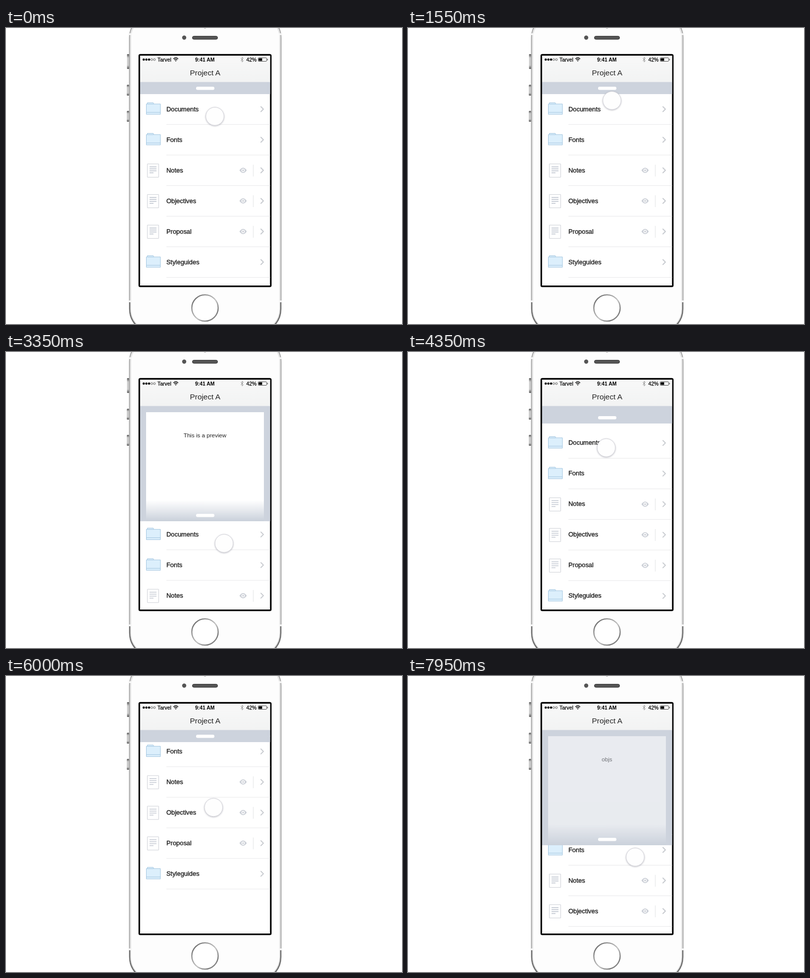
An HTML page for the animation above (8000 ms loop, 800 by 600 pixels).

```html
<!DOCTYPE html>
<html lang="en">
<head>
<meta charset="utf-8">
<title>Project files</title>
<style>
  html, body { margin: 0; width: 100%; height: 100%; overflow: hidden; background: #fff; }
  svg { display: block; width: 800px; height: 600px; }
  text { font-family: "Liberation Sans", Arial, sans-serif; fill: #222; }
  .medium { stroke: #222; stroke-width: .4; }
  .status { font-size: 10.4px; fill: #000; stroke: #000; stroke-width: .25; }
  .label { font-size: 12.9px; }
  .line { fill: none; stroke-linecap: round; stroke-linejoin: round; }
</style>
</head>
<body>
<svg viewBox="0 0 800 600">
  <defs>
    <clipPath id="screenClip"><rect x="271" y="56" width="262.5" height="466.5"/></clipPath>
    <clipPath id="chinClip"><rect x="240" y="556" width="325" height="44"/></clipPath>
    <linearGradient id="header" x2="0" y2="1">
      <stop stop-color="#f8f8f8"/><stop offset="1" stop-color="#f2f3f3"/>
    </linearGradient>
    <linearGradient id="fade" x2="0" y2="1">
      <stop stop-color="#cdd3dd" stop-opacity="0"/><stop offset="1" stop-color="#c9d0da"/>
    </linearGradient>
    <linearGradient id="ring" x2="1" y2="1">
      <stop stop-color="#555"/><stop offset=".3" stop-color="#999"/>
      <stop offset=".55" stop-color="#c4c4c4"/><stop offset=".8" stop-color="#777"/>
      <stop offset="1" stop-color="#aaa"/>
    </linearGradient>
    <linearGradient id="button" x2="0" y2="1">
      <stop stop-color="#555"/><stop offset=".25" stop-color="#ccc"/>
      <stop offset=".75" stop-color="#ccc"/><stop offset="1" stop-color="#555"/>
    </linearGradient>
    <filter id="shadow" x="-30%" y="-30%" width="160%" height="160%">
      <feDropShadow dx="0" dy="1" stdDeviation="1.6" flood-color="#555566" flood-opacity=".4"/>
    </filter>

    <g id="chevron"><path class="line" d="M515 -4.5l5 5-5 5" stroke="#c6c9ce" stroke-width="1.9"/></g>
    <g id="folder">
      <path d="M285.5 -10v-2.5h12l1 2.5h13.5v21h-28.5v-21z" fill="#dceffc" stroke="#a3c5df"/>
      <path d="M285.5 -9.8h13M283.5 7h28.5" stroke="#a3c5df" fill="none"/>
    </g>
    <g id="note">
      <rect x="285.5" y="-12.5" width="23" height="27" rx=".5" fill="#fff" stroke="#cdd0d6"/>
      <path d="M290 -6.5h14M290 -2.5h14M290 1.5h14M290 5.5h8" stroke="#b9bfca" stroke-width="1.3"/>
      <path d="M471.5 .5q7.5-10.5 15 0q-7.5 10.5-15 0z" fill="#cdd1d8"/>
      <circle cx="479" cy=".5" r="3.3" fill="#fff"/>
      <circle cx="479" cy=".5" r="1.7" fill="#c6cad2"/>
      <path d="M499.5 -11v24" stroke="#e2e3e5"/>
    </g>
  </defs>

  <g id="phone">
    <g fill="url(#button)">
      <rect x="244.5" y="53" width="4.5" height="30" rx="1"/>
      <rect x="244" y="115" width="5" height="22" rx="1.5"/>
      <rect x="244" y="168" width="5" height="22" rx="1.5"/>
    </g>
    <rect x="249.5" y="-28" width="306" height="646" rx="48" fill="#fff" stroke="#a2a2a2" stroke-width="2"/>
    <rect x="252" y="-25.5" width="301" height="641" rx="46" fill="#fdfdfd" stroke="#dedede" stroke-width="1.5"/>
    <rect x="250" y="-28" width="305" height="645.5" rx="48" fill="none" stroke="#6d6d6d" stroke-width="2.2" clip-path="url(#chinClip)"/>
    <path d="M247 12.5h7M551 12.5h7M247 554h7M551 554h7" stroke="#f8f8f8" stroke-width="3.5"/>
    <circle cx="402" cy="-2" r="3" fill="#aaa"/>
    <circle cx="360" cy="19.5" r="4.2" fill="#555"/>
    <rect x="376.5" y="16.5" width="51" height="6.5" rx="3.2" fill="#555" stroke="#333"/>
    <circle cx="402" cy="567.5" r="26.6" fill="#fff" stroke="url(#ring)" stroke-width="2.4"/>
    <rect x="269.3" y="54.3" width="265.6" height="469.4" rx="2" fill="#fff" stroke="#000" stroke-width="3.2"/>
  </g>

  <g clip-path="url(#screenClip)">
    <g id="list"></g>
    <g id="panel">
      <rect id="backdrop" x="271" y="109" width="263" fill="#cdd3dd"/>
      <g id="card">
        <rect id="paper" x="283" y="122" width="238" fill="#fff"/>
        <text id="caption" x="402" y="172.5" font-size="11.6" text-anchor="middle"></text>
        <rect id="cardFade" x="283" width="238" height="43" fill="url(#fade)"/>
      </g>
      <rect id="handle" x="384" width="37" height="6.5" rx="3" fill="#fff"/>
    </g>
    <rect x="271" y="56" width="263" height="53.5" fill="url(#header)"/>
    <text x="402.3" y="95.5" font-size="15.4" text-anchor="middle">Project A</text>
    <g id="dots"></g>
    <text class="status" x="306" y="67.7" font-size="10">Tarvel</text>
    <g class="line" stroke="#000" stroke-width="1.4">
      <path d="M338.6 62.3q4.4-4 8.8 0M340.5 64.4q2.5-2.2 5 0"/>
      <path d="M342.8 66.5h.4" stroke-width="1.8"/>
    </g>
    <text class="status" x="401.7" y="67.7" text-anchor="middle" font-weight="bold" style="stroke:none">9:41 AM</text>
    <path class="line" d="M474.5 61.5l5 5-2.5 2.5v-10l2.5 2.5-5 5" stroke="#888" stroke-width=".9"/>
    <text class="status" x="485.5" y="67.7">42%</text>
    <rect x="509.5" y="60.5" width="17" height="7" rx="1" fill="#fff" stroke="#333" stroke-width=".9"/>
    <rect x="510.5" y="61.5" width="7" height="5" fill="#000"/>
    <path d="M528.5 62.5v3" stroke="#333"/>
  </g>
  <circle id="touch" r="18.3" fill="#fff" fill-opacity=".97" stroke="#cfcfd6" filter="url(#shadow)"/>
</svg>

<script>
const LOOP = 8000, HEADER = 109, CLOSED = 134, ROW = 62;
const byId = id => document.getElementById(id);
const set = (id, attrs) => {
  for (const name in attrs) byId(id).setAttribute(name, attrs[name]);
};

const files = [
  ["Documents", "folder"], ["Fonts", "folder"], ["Notes", "note"],
  ["Objectives", "note"], ["Proposal", "note"], ["Styleguides", "folder"]
];
byId("list").innerHTML = files.map(([name, kind], i) => `
  <g transform="translate(0 ${164 + i * ROW})">
    <use href="#${kind}"/><use href="#chevron"/>
    <text class="label medium" x="324" y="4.5">${name}</text>
    <path d="M324 31.5h210" stroke="#e8e8ea"/>
  </g>`).join("");

byId("dots").innerHTML = [0, 1, 2, 3, 4].map(i =>
  `<circle cx="${278.2 + i * 5.4}" cy="64" r="2" fill="${i < 3 ? "#000" : "none"}" stroke="#000" stroke-width=".6"/>`
).join("");

// Each track is a list of [time, value].
const tracks = {
  x: [[0, 422], [700, 419], [1550, 412], [1750, 406], [2550, 412], [3050, 441], [3350, 440.5],
      [4350, 400.5], [5300, 414], [6050, 420], [6450, 476], [6850, 476], [7950, 459]],
  y: [[0, 179], [700, 177], [1550, 147], [1750, 126], [1900, 126], [2600, 337], [2700, 337],
      [3200, 391.5], [3300, 391], [3350, 388], [4000, 200], [4350, 194], [5300, 335],
      [5500, 340], [5600, 340], [6100, 258], [6500, 272], [6850, 280], [7950, 367]],
  open: [[1900, 0], [2600, 209], [3450, 209], [4350, 11], [4550, 0], [6650, 0], [6850, 43], [7250, 209]],
  scroll: [[3300, 0], [3350, -3.5], [3500, -14], [4000, 0], [4350, 9], [4550, 0],
           [5600, 0], [6100, -82], [6850, -81], [7950, -83]],
  preview: [[2550, 0], [2900, 1], [3400, 1], [3800, 0], [7700, 0], [7950, .55], [8150, 1]]
};

// Monotone cubic interpolation: smooth motion without overshoot.
function sample(keys, t) {
  const last = keys.length - 1;
  if (t <= keys[0][0]) return keys[0][1];
  if (t >= keys[last][0]) return keys[last][1];
  const i = keys.findIndex(key => key[0] > t) - 1;
  const slope = k => (keys[k + 1][1] - keys[k][1]) / (keys[k + 1][0] - keys[k][0]);
  const tangent = k => {
    if (k === 0 || k === last) return 0;
    const a = slope(k - 1), b = slope(k);
    return a * b <= 0 ? 0 : 2 * a * b / (a + b);
  };
  const [[t0, v0], [t1, v1]] = [keys[i], keys[i + 1]];
  const span = t1 - t0, u = (t - t0) / span, w = 1 - u;
  return w * w * ((1 + 2 * u) * v0 + u * span * tangent(i))
       + u * u * ((1 + 2 * w) * v1 - w * span * tangent(i + 1));
}

function draw(t) {
  const at = name => sample(tracks[name], t);
  const open = at("open"), bottom = CLOSED + open;
  set("list", { transform: `translate(0 ${open + at("scroll")})` });
  set("backdrop", { height: bottom - HEADER });
  set("handle", { y: bottom - 15 });
  set("card", { opacity: at("preview") });
  set("paper", { height: bottom - 122 });
  set("cardFade", { y: bottom - 43 });
  set("touch", { cx: at("x"), cy: at("y") });
  byId("caption").textContent = t < 5000 ? "This is a preview" : "objs";
}

const start = performance.now();
function tick() {
  draw((performance.now() - start) % LOOP);
  requestAnimationFrame(tick);
}
tick();
</script>
</body>
</html>
```
